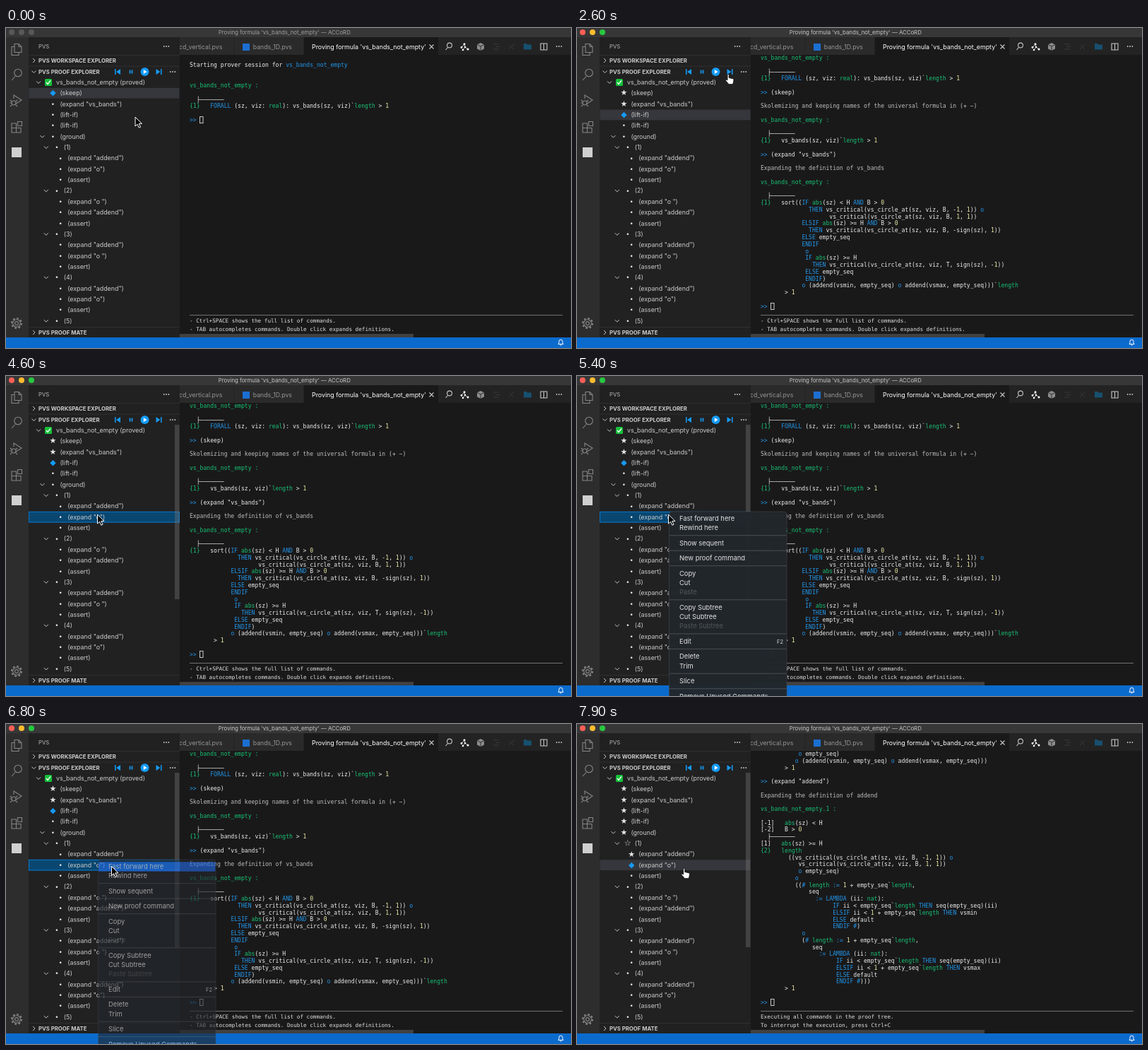
An HTML page that plays this animation: 800x453 px, repeating every 8000 ms.

```html
<!DOCTYPE html>
<html lang="en">
<head>
<meta charset="utf-8">
<title>Proof explorer</title>
<style>
  html, body { margin: 0; width: 100%; height: 100%; overflow: hidden; background: #1a191a; }
  svg { display: block; width: 100vw; height: 100vh; }
  text { font-family: Inter, sans-serif; white-space: pre; }
  .mono { font-family: "DejaVu Sans Mono", monospace; }
  .glyph { font-family: "DejaVu Sans", sans-serif; }
  .icon { fill: none; stroke: #858585; stroke-width: 1.1; }
  .tool { fill: none; stroke: #c8c8c8; stroke-width: 1.1; }
</style>
</head>
<body>
<svg id="stage" viewBox="0 0 800 453" preserveAspectRatio="none">
  <defs>
    <clipPath id="logClip"><rect x="246" y="37.5" width="554" height="366"/></clipPath>
    <clipPath id="treeClip"><rect x="32" y="69" width="214" height="354"/></clipPath>
    <clipPath id="tabClip"><rect x="246" y="13" width="554" height="26"/></clipPath>
  </defs>
  <rect width="800" height="453" fill="#1a191a"/>
  <rect width="800" height="13" fill="#373738"/>
  <rect y="13" width="32" height="425" fill="#2d2d2d"/>
  <rect x="32" y="13" width="214" height="425" fill="#212122"/>
  <rect x="246" y="13" width="554" height="25" fill="#232324"/>
  <rect x="246" y="13" width="76" height="25" fill="#2a2a2b"/>
  <rect x="323" y="13" width="98" height="25" fill="#2a2a2b"/>
  <rect x="422" y="13" width="190" height="25" fill="#1a191a"/>
  <path d="M32 38.5h214M32 54h214M32 423.5h214" stroke="#353536" stroke-width=".7"/>
  <rect y="438" width="800" height="15" fill="#0b6bcd"/>
  <rect x="246" y="433" width="331" height="5" fill="#414142"/>
  <path d="M260 406.5h528" stroke="#a0a0a0" stroke-width=".65"/>

  <g id="lights"><circle cx="8" cy="6" r="4"/><circle cx="22" cy="6" r="4"/><circle cx="36" cy="6" r="4"/></g>

  <!-- activity bar -->
  <g class="icon">
    <path d="M12 22.500h6l4 4v8h-10zM18 22.500v4h4M12 26.500h-4v12h10v-4"/>
    <path d="M8 74l5-5.500"/><circle cx="17" cy="63.500" r="5.300"/>
    <path d="M11 100v-5l11 7-9 6"/><circle cx="11" cy="106" r="3"/><path d="M6 102l2 2M16 102l-2 2M5.500 106h3M6 111l2-2M16 111l-2-2"/>
    <path d="M8 135h6.500v13h-6.500zM8 141.500h13v6.500h-13M16.500 132.500h6v6h-6z"/>
    <circle cx="15" cy="418" r="2.400"/><circle cx="15" cy="418" r="5.300"/>
    <circle cx="15" cy="418" r="7" stroke-width="2" stroke-dasharray="2.75"/>
  </g>
  <rect x="8" y="169" width="14" height="14" fill="#d0d0d0"/>

  <!-- proof controls -->
  <g fill="#159bf5">
    <path d="M154 58h1.500v8h-1.500zM162 58v8l-6-4zM174.700 59.500h1.700v5h-1.700zM177.700 59.500h1.700v5h-1.700zM212.500 58v8l6-4zM219 58h1.500v8h-1.500z"/>
    <circle cx="196.500" cy="62" r="6"/><path d="M194.800 59v6l4.800-3z" fill="#fff"/>
  </g>

  <!-- editor toolbar -->
  <rect x="335" y="22" width="10" height="10" fill="#1b6fd2"/>
  <path class="tool" d="M599.500 23.500l6 6m0-6l-6 6M622.500 31l3-3.500M757 22h9v9h-9zM761.500 22v9"/>
  <circle class="tool" cx="628" cy="24.500" r="3.400"/>
  <path d="M645 27.500l4-4.500 1 4 4 3M650 27l-3 4" fill="none" stroke="#fff" stroke-width=".7"/>
  <g fill="#fff"><circle cx="649" cy="22.800" r="1.500"/><circle cx="645" cy="27.500" r="1.400"/><circle cx="654" cy="30" r="1.500"/><circle cx="647" cy="31" r="1.300"/><circle cx="650" cy="27" r="1.200"/></g>
  <path d="M672 21l5 2.500v6l-5 2.500-5-2.500v-6z" fill="#8c8c8c"/><path d="M667 23.500l5 2.500 5-2.500M672 26v6" fill="none" stroke="#333"/>
  <path d="M690 23h8M693 26.500h6M690 30h8M712 30l8-8M713 24l6 6" stroke="#39393a" fill="none"/>
  <path d="M733 22h4l1 1.500h6v7h-11z" fill="#17506f"/>
  <path d="M782 447.500h7l-1-1.800v-2a2.500 2.500 0 0 0-5 0v2zM784.500 449h2" fill="none" stroke="#fff"/>

  <g id="labels"></g>
  <g id="tree" clip-path="url(#treeClip)"></g>
  <rect id="scrollbar" x="239" y="69" width="6.500" height="247" fill="#79797a" opacity=".38"/>
  <g clip-path="url(#logClip)"><g id="log"></g></g>
  <g id="prompt"><rect x="274.500" y="-4.500" width="4.500" height="9" fill="none" stroke="#ddd" stroke-width=".9"/></g>
  <g id="menu"><rect x="130.500" y="192" width="166.500" height="270" rx="4" fill="#22272c" stroke="#45494d" stroke-width=".6"/></g>
  <g id="cursor" stroke-linejoin="round">
    <path id="arrow" d="M0 0v13l3-2.800 2.300 5 2.200-1-2.300-4.800h4.200z" fill="#000" stroke="#fff"/>
    <path id="hand" d="M-1 1a1.100 1.100 0 0 1 2.200 0v4l5.500 1.200q1.400.4 1.300 2l-.5 3.200-1 2.800h-5.500l-4.300-5q-1-1.600.5-1.800l1.800 1z" fill="#fff" stroke="#111" stroke-width=".9"/>
  </g>
</svg>
<script>
const $ = id => document.getElementById(id);
const LOOP = 8000;

function add(parent, tag, attrs = {}, content = '') {
  const node = document.createElementNS('http://www.w3.org/2000/svg', tag);
  for (const key in attrs) node.setAttribute(key, attrs[key]);
  node.textContent = content;
  return parent.appendChild(node);
}
// y is the optical middle of the line
const label = (parent, x, y, text, size = 8.85, fill = '#ccc', extra = {}) =>
  add(parent, 'text', { x, y: y + size * .35, 'font-size': size, fill, ...extra }, text);
const show = (node, on) => node.style.display = on ? '' : 'none';
const latest = (steps, t) => steps.filter(s => s[0] <= t).pop();

// Fixed labels
const labels = $('labels'), bold = { 'font-weight': 700 }, middle = { 'text-anchor': 'middle' };
const windowTitle = label(labels, 394.3, 6, "Proving formula 'vs_bands_not_empty' — ACCoRD", 7.82, '#ccc', middle);
label(labels, 46, 26.5, 'PVS', 7.7, '#bbb');
label(labels, 46, 46, 'PVS WORKSPACE EXPLORER', 7.75, '#ccc', bold);
label(labels, 46, 62, 'PVS PROOF EXPLORER', 7.75, '#ccc', bold);
label(labels, 46, 431, 'PVS PROOF MATE', 7.75, '#ccc', bold);
label(labels, 245, 26.5, 'cd_vertical.pvs', 8.75, '#969696', { 'clip-path': 'url(#tabClip)' });
label(labels, 349.7, 26.5, 'bands_1D.pvs', 8.75, '#969696');
label(labels, 433, 26.5, "Proving formula 'vs_bands_not_empty'", 8.85, '#fff');
for (const [x, y] of [[227, 26], [236, 62], [783, 26]])
  for (const dx of [-3.3, 0, 3.3]) add(labels, 'circle', { cx: x + dx, cy: y, r: .9, fill: '#ccc' });

const chevron = (parent, x, y, open) => add(parent, 'path', {
  d: open ? `M${x - 3} ${y - 1.5}l3 3 3-3` : `M${x - 1.5} ${y - 3}l3 3-3 3`,
  fill: 'none', stroke: '#c5c5c5', 'stroke-width': 1
});
chevron(labels, 39.5, 46, false);
chevron(labels, 39.5, 62, true);
chevron(labels, 39.5, 431, false);

const hints = [
  ['- Ctrl+SPACE shows the full list of commands.', 'Executing all commands in the proof tree.'],
  ['- TAB autocompletes commands. Double click expands definitions.', 'To interrupt the execution, press Ctrl+C']
];
const hintNodes = hints.map((h, i) => label(labels, 260, 414.5 + 11.5 * i, h[0], 7.65, '#e0e0e0', { class: 'mono' }));

// Proof tree
const A = '(expand "addend")', O = '(expand "o")', O2 = '(expand "o ")', END = '(assert)';
const branch = (n, ...cmds) => [[2, `(${n})`], ...cmds.map(c => [3, c])];
const rows = [
  [0, 'vs_bands_not_empty (proved)'], [1, '(skeep)'], [1, '(expand "vs_bands")'],
  [1, '(lift-if)'], [1, '(lift-if)'], [1, '(ground)'],
  ...branch(1, A, O, END), ...branch(2, O2, A, END), ...branch(3, A, O2, END), ...branch(4, A, O, END), ...branch(5)
];
const ROW = 15.35, rowY = i => 76.9 + ROW * i;
const highlight = add($('tree'), 'rect', { x: 32.4, width: 213, height: ROW - .6 });
const markers = rows.map(([level, text], i) => {
  const x = 71 + 5.4 * level, y = rowY(i);
  label($('tree'), x, y, text);
  if (level % 2 === 0 || text === '(ground)') chevron($('tree'), x - 25, y, true);
  if (level) return label($('tree'), x - 10, y, '•', 9, '#ddd', { class: 'glyph', ...middle });
  add($('tree'), 'rect', { x: 55, y: y - 5, width: 10, height: 10, rx: 1.5, fill: '#16c13a' });
  add($('tree'), 'path', { d: `M57 ${y}l2 2.5 4-5`, fill: 'none', stroke: '#fff', 'stroke-width': 1.5 });
});
const activeRow = [[0, 1], [1100, 2], [1900, 3], [7000, 4], [7100, 5], [7200, 7], [7400, 8]];

function drawTree(t) {
  const active = latest(activeRow, t)[1], picked = t >= 3400 && t < 7000;
  highlight.setAttribute('y', rowY(picked ? 8 : active) - ROW / 2 + .3);
  highlight.setAttribute('fill', picked ? '#094771' : '#36373c');
  highlight.setAttribute('stroke', picked ? '#087bd2' : 'none');
  markers.forEach((m, i) => {
    if (!m) return;
    m.textContent = i === active ? '◆' : i > active ? '•' : i === 6 ? '☆' : '★';
    m.setAttribute('fill', i === active ? '#159bf5' : '#e8e8e8');
    m.setAttribute('font-size', i <= active ? 11 : 9);
  });
  show($('scrollbar'), t >= 2700);
}

// Prover log: each block appears at its time
const BAR = '  ├───────';
const title = (suffix = '') => `vs_bands_not_empty${suffix} :\n`;
const tail = `           o empty_seq)
          o (addend(vsmin, empty_seq) o addend(vsmax, empty_seq)))
       > 1
`;
const firstGoal = `[-1]   abs(sz) < H
[-2]   B > 0
${BAR}
[1]   abs(sz) >= H
{2}   length
`;
const bands = `        ((vs_critical(vs_circle_at(sz, viz, B, -1, 1)) o
           vs_critical(vs_circle_at(sz, viz, B, 1, 1))
`;
const lifted = `>> (lift-if)

Lifting IF-conditions to the top level

${title()}
${BAR}
{1}   IF abs(sz) < H AND B > 0
        THEN length
${bands}${tail}      ELSE length(sort(empty_seq)) > 1
      ENDIF
`;
const sequence = (indent, open, bound, close) => {
  const pad = n => '\n' + ' '.repeat(indent + open.length + n);
  return ' '.repeat(indent) + open + '# length := 1 + empty_seq`length,'
    + pad(2) + 'seq' + pad(4) + ':= LAMBDA (ii: nat):'
    + pad(9) + 'IF ii < empty_seq`length THEN seq(empty_seq)(ii)'
    + pad(9) + `ELSIF ii < 1 + empty_seq\`length THEN ${bound}`
    + pad(9) + 'ELSE default' + pad(9) + `ENDIF ${close}\n`;
};

const blocks = [
  [0, `
Starting prover session for vs_bands_not_empty


${title()}
${BAR}
{1}   FORALL (sz, viz: real): vs_bands(sz, viz)\`length > 1
`],
  [1100, `>> (skeep)

Skolemizing and keeping names of the universal formula in (+ −)

${title()}
${BAR}
{1}   vs_bands(sz, viz)\`length > 1
`],
  [1900, `>> (expand "vs_bands")

Expanding the definition of vs_bands

${title()}
${BAR}
{1}   sort((IF abs(sz) < H AND B > 0
              THEN vs_critical(vs_circle_at(sz, viz, B, -1, 1)) o
                    vs_critical(vs_circle_at(sz, viz, B, 1, 1))
            ELSIF abs(sz) >= H AND B > 0
              THEN vs_critical(vs_circle_at(sz, viz, B, -sign(sz), 1))
            ELSE empty_seq
            ENDIF
             o
             IF abs(sz) >= H
               THEN vs_critical(vs_circle_at(sz, viz, T, sign(sz), -1))
             ELSE empty_seq
             ENDIF)
            o (addend(vsmin, empty_seq) o addend(vsmax, empty_seq)))\`length
       > 1
`],
  [7000, lifted],
  [7100, lifted],
  [7200, `>> (ground)\n\n${title('.1')}\n${firstGoal}${bands}${tail}`],
  [7400, `>> (expand "addend")

Expanding the definition of addend

${title('.1')}
${firstGoal}${bands}           o empty_seq)
          o
${sequence(10, '((', 'vsmin', '#)')}            o
${sequence(12, '(', 'vsmax', '#)))')}       > 1
`]
];

const BLUE = '#2196e8', GREEN = '#17c274', YELLOW = '#eeeea6', WHITE = '#ececec';
const tokens = /(vs_bands_not_empty\S* :|\{\d\}|\b(?:abs|length|real|nat)\b)|(\b(?:FORALL|LAMBDA|IF|THEN|ELSIF|ELSE|ENDIF|AND|o)\b|:=|#|^>>|vs_bands_not_empty$)|(\[-?\d\])|(\b\d\b)/g;
const tokenColours = [GREEN, BLUE, WHITE, YELLOW];
const monoSize = 8.08, LINE = 9.77, FIRST_LINE = 42.2;

function addLine(text, i) {
  const prose = /^(Skolem|Expanding|Lifting)/.test(text);
  const node = label($('log'), 260, FIRST_LINE + LINE * i, '', monoSize, prose ? '#bdbdbd' : WHITE, { class: 'mono' });
  if (prose) { node.textContent = text; return node; }
  let end = 0;
  for (const m of text.matchAll(tokens)) {
    node.append(text.slice(end, m.index));
    add(node, 'tspan', { fill: tokenColours[m.slice(1).findIndex(Boolean)] }, m[0]);
    end = m.index + m[0].length;
  }
  node.append(text.slice(end));
  return node;
}
// A block's last, empty line is where the prompt sits and the next block starts
const lines = [], lineCounts = [];
for (const [time, text] of blocks) {
  for (const line of text.split('\n').slice(0, -1)) lines.push(addLine(line, lines.length));
  lines.push(addLine('', lines.length));
  lineCounts.push([time, lines.length]);
}
label($('prompt'), 260, 0, '>>', monoSize, BLUE, { class: 'mono' });

function drawLog(t) {
  const count = latest(lineCounts, t)[1], scroll = Math.max(0, count - 36);
  lines.forEach((line, i) => show(line, i >= scroll && i < count));
  $('log').setAttribute('transform', `translate(0 ${-LINE * scroll})`);
  $('prompt').setAttribute('transform', `translate(0 ${FIRST_LINE + LINE * (count - scroll)})`);
  hintNodes.forEach((node, i) => node.textContent = hints[i][t >= 7000 ? 1 : 0]);
}

// Context menu
const menuGroups = [
  ['Fast forward here', 'Rewind here'], ['Show sequent'], ['New proof command'], ['Copy', 'Cut', 'Paste'],
  ['Copy Subtree', 'Cut Subtree', 'Paste Subtree'], ['Edit'], ['Delete', 'Trim'], ['Slice'], ['Remove Unused Commands']
];
const hovered = add($('menu'), 'rect', { x: 131, y: 195.3, width: 165.5, height: 13.4, fill: '#2468e0' });
let menuY = 201.7;
menuGroups.forEach((group, g) => {
  if (g) add($('menu'), 'path', { d: `M131 ${menuY - 10.8}h165.500`, stroke: '#4b5054', 'stroke-width': 1 });
  for (const item of group) {
    label($('menu'), 145, menuY, item, 9.4, item.startsWith('Paste') ? '#54585c' : '#e6e6e6');
    if (item === 'Edit') label($('menu'), 292, menuY + .5, 'F2', 7.5, '#ddd', { 'text-anchor': 'end' });
    menuY += 13.3;
  }
  menuY += 8.2;
});

// Pointer
const path = [[0, 183, 126], [100, 183, 126], [900, 214, 65.5], [2600, 214, 65.5], [3400, 131.5, 197.5], [4100, 131.5, 197.5],
  [4400, 129.5, 196], [5500, 129.5, 196], [6300, 149.5, 201.5], [7200, 149.5, 201.5], [7600, 151.5, 204.5], [LOOP, 151.5, 204.5]];

function drawPointer(t) {
  const i = path.findIndex(p => p[0] > t), [t0, x0, y0] = path[i - 1], [t1, x1, y1] = path[i];
  const u = (t - t0) / (t1 - t0), k = u * u * (3 - 2 * u);
  $('cursor').setAttribute('transform', `translate(${x0 + (x1 - x0) * k} ${y0 + (y1 - y0) * k})`);
  const hand = t >= 800 && t < 4600 || t >= 7000;
  show($('hand'), hand);
  show($('arrow'), !hand);
}

const lightColours = ['#ff5f57', '#febc2e', '#28c840'];

function drawWindow(t) {
  const focused = t >= 900;
  [...$('lights').children].forEach((c, i) => c.setAttribute('fill', focused ? lightColours[i] : '#58585a'));
  windowTitle.setAttribute('fill', focused ? '#c8c8c8' : '#a0a0a0');
}

function draw(now) {
  const t = Math.floor(now % LOOP / 100) * 100;
  drawWindow(t);
  drawTree(t);
  drawLog(t);
  show($('menu'), t >= 4700 && t < 7000);
  $('menu').setAttribute('opacity', t < 6700 ? .98 : 1 - (t - 6600) / 550);
  show(hovered, t >= 5900);
  drawPointer(t);
}

const start = performance.now();
(function tick() {
  draw(performance.now() - start);
  requestAnimationFrame(tick);
})();
</script>
</body>
</html>
```
